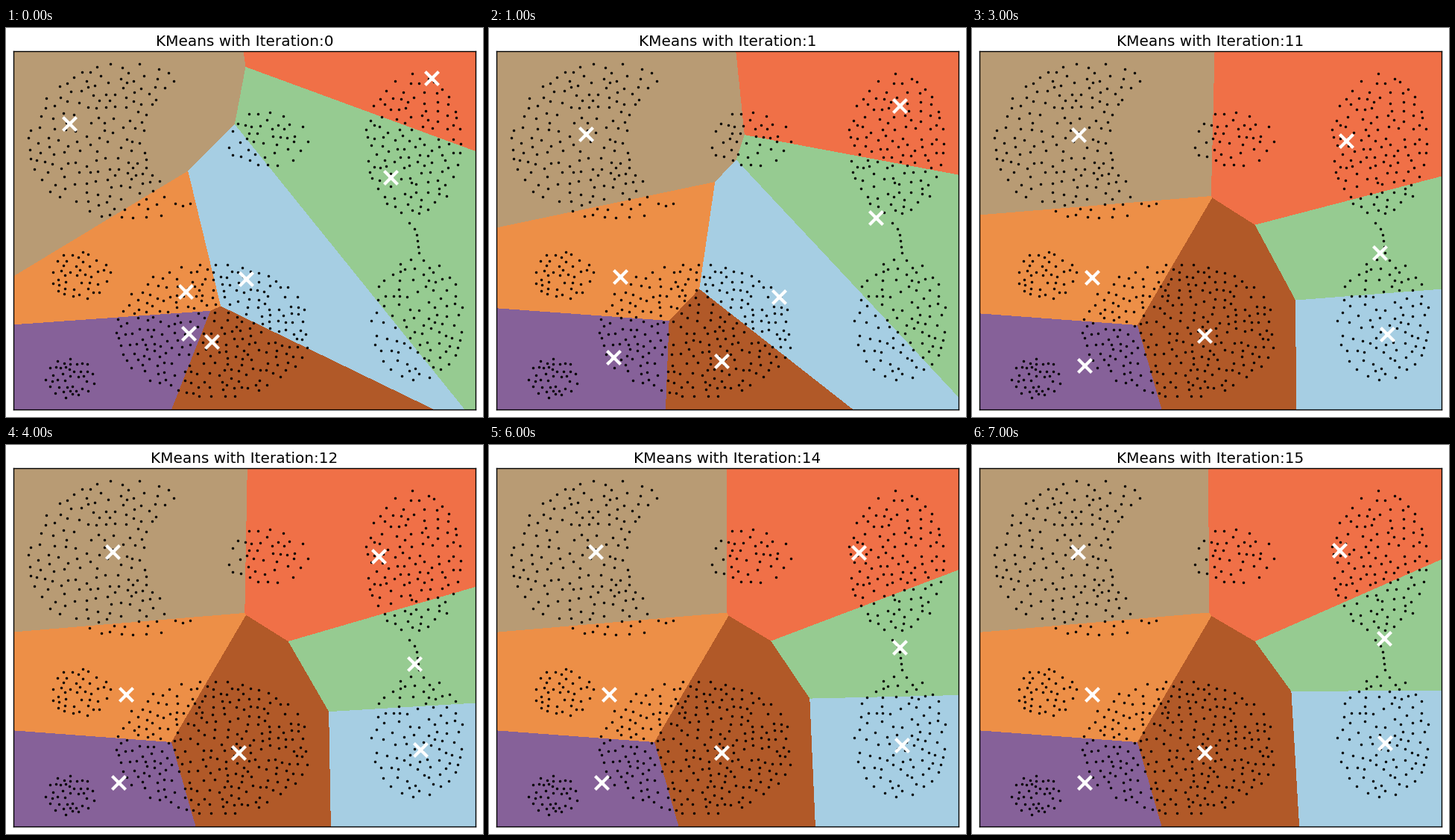
A matplotlib script for the animation above (8 s loop, 640 by 521 pixels).

```python
import matplotlib.pyplot as plt
import numpy as np
from matplotlib.animation import FuncAnimation
from matplotlib.colors import LinearSegmentedColormap

W, H, DPI = 640, 521, 100
LEFT, RIGHT, TOP, BOTTOM = 10, 630, 31, 511
UNIT = np.array([620 / 35.2, 480 / 29.2])  # pixels per data unit
STEPS = [0, 1, *range(10, 16)]
rng = np.random.default_rng(7)


def scatter_in(count, cx, cy, rx, ry, bite=None):
    """Spread points loosely over an ellipse, leaving out an optional second one."""
    centre, radii = np.array([cx, cy]), np.array([rx, ry])
    pool = rng.uniform(centre - radii, centre + radii, (count * 40, 2))
    keep = (((pool - centre) / radii) ** 2).sum(1) < 1
    if bite:
        keep &= (((pool - bite[:2]) / bite[2:]) ** 2).sum(1) > 1
    pool = pool[keep]
    gap = np.full(len(pool), np.inf)
    chosen = []
    for _ in range(count):
        some = rng.integers(len(pool), size=14)
        new = pool[some[gap[some].argmax()]]
        chosen.append(new)
        gap = np.minimum(gap, np.linalg.norm(pool - new, axis=1))
    return np.array(chosen)


link = np.arange(6)
points = np.vstack([
    scatter_in(170, 163, 152, 135, 106, bite=(262, 148, 76, 85)),
    scatter_in(42, 349, 148, 57, 38),
    scatter_in(127, 546, 156, 65, 95),
    scatter_in(100, 551, 390, 64, 82),
    scatter_in(273, 277, 405, 131, 91),
    scatter_in(42, 99, 331, 42, 32),
    scatter_in(40, 86, 469, 34, 27),
    np.c_[554 - 13 * 0.5 ** link, 261 + 8 * link],
])

# Centroid order: light blue, green, tan, red, orange, purple, brown.
START = np.array([(322, 335.8), (515.7, 199.5), (84.7, 128), (571.3, 67.2),
                  (240.5, 353), (245, 409), (275.5, 419.5)])
SECOND = np.array([(389.2, 360.3), (519.3, 254), (130.1, 142), (551.4, 104),
                   (176, 333), (167, 441), (312.2, 446)])
SETTLED = np.array([(557, 411.6), (546.3, 307), (143.4, 143.3), (503.5, 152.2),
                    (161.2, 334.3), (151.2, 452), (312.2, 411.6)])
DRIFT = np.zeros((7, 2))  # movement from iteration 10 to 15
DRIFT[:4] = (-3.5, -12.5), (6.2, -47.7), (-1, -0.2), (-10.5, -11)


def centroids(step):
    if step < 10:
        return SECOND if step else START
    return SETTLED + DRIFT * ((step - 10) / 5) ** 1.3


gx, gy = np.meshgrid(np.arange(LEFT, RIGHT) + 0.5, np.arange(TOP, BOTTOM) + 0.5)


def regions(centres):
    dist = [((gx - x) / UNIT[0]) ** 2 + ((gy - y) / UNIT[1]) ** 2
            for x, y in centres]
    return np.argmin(dist, axis=0)


fig = plt.figure(figsize=(W / DPI, H / DPI), dpi=DPI, facecolor="white")
ax = fig.add_axes([LEFT / W, 1 - BOTTOM / H, (RIGHT - LEFT) / W, (BOTTOM - TOP) / H])
paired = LinearSegmentedColormap.from_list("paired", plt.cm.Paired.colors)
image = ax.imshow(regions(START), cmap=paired, vmin=0, vmax=6,
                  extent=(LEFT, RIGHT, BOTTOM, TOP), interpolation="nearest",
                  aspect="auto")
ax.plot(*points.T, "k.", ms=4, mew=0.5)
marks = ax.scatter(*START.T, marker="x", s=169, linewidths=3, color="w", zorder=10)
ax.set(xlim=(LEFT, RIGHT), ylim=(BOTTOM, TOP), xticks=[], yticks=[])
for spine in ax.spines.values():
    spine.set_linewidth(1)
title = fig.text(0.5, 1 - 24.5 / H, "", ha="center", va="baseline",
                 fontsize=14.4, family="DejaVu Sans", color="black")


def update(i):
    centres = centroids(STEPS[i])
    image.set_data(regions(centres))
    marks.set_offsets(centres)
    title.set_text(f"KMeans with Iteration:{STEPS[i]}")
    return image, marks, title


anim = FuncAnimation(fig, update, frames=len(STEPS), interval=1000,
                     repeat=True, repeat_delay=0, blit=False)
plt.show()
```
